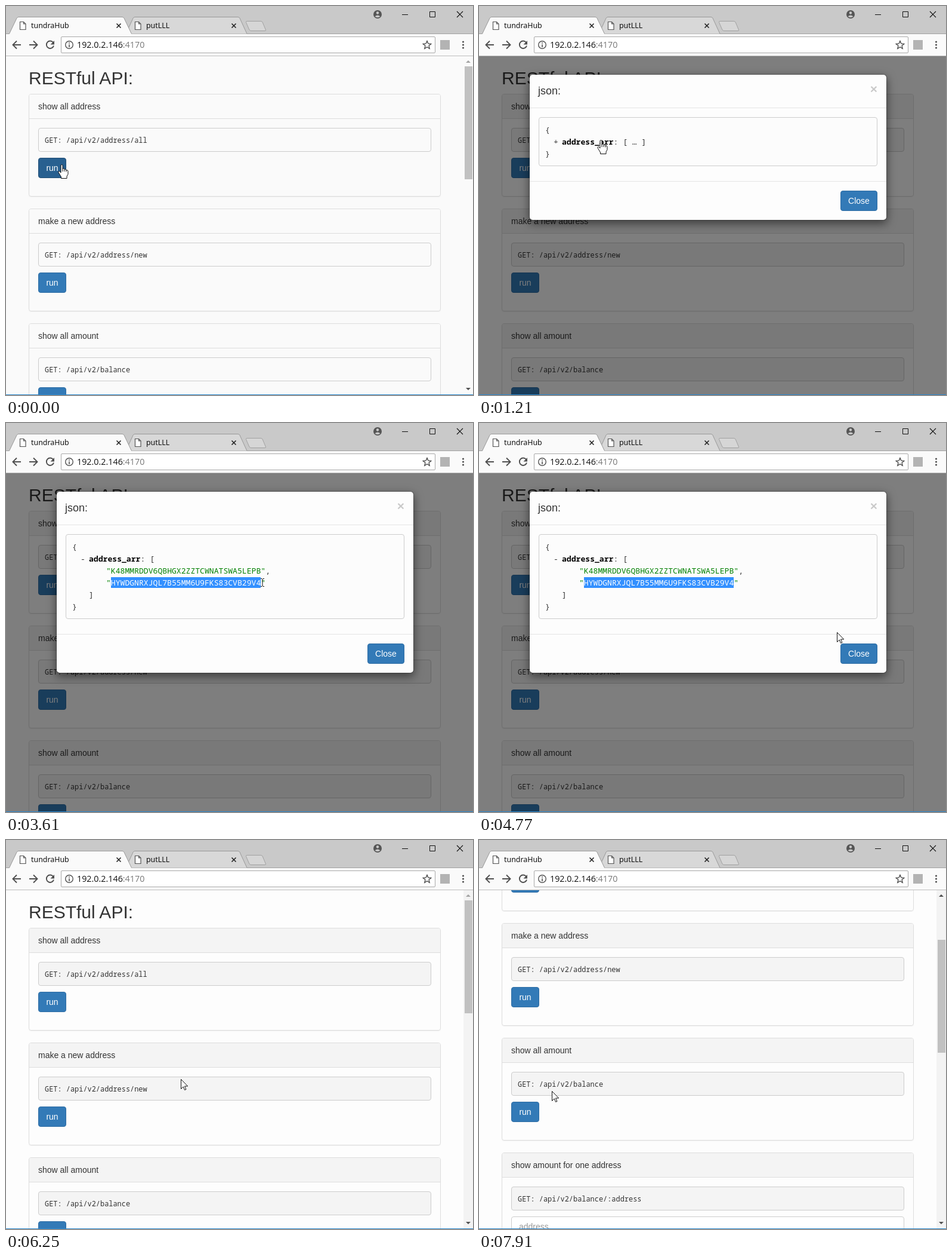
These frames come from a looping animation (783x651 px, 8000 ms). An HTML page:

```html
<!DOCTYPE html>
<html lang="en">
<head>
<meta charset="utf-8">
<title>API demo</title>
<style>
* { box-sizing: border-box; }
html, body { margin: 0; width: 100%; height: 100%; overflow: hidden; }
body { position: relative; background: #fdfdfd; color: #333; font: 14px/20px "Liberation Sans", Arial, sans-serif; }
svg { position: absolute; left: 0; top: 0; }

/* every animated part shares one 8 s clock and holds its pose between steps */
.view, .page, .tint, .first, .bar, .thumb, .up, .shade, .modal, .json, .short, .long, .sel, .close,
.cursor, .arrow, .hand, .beam { animation: 8s step-end infinite; }

/* page */
.view { position: absolute; left: 0; top: 84px; width: 783px; height: 566px; overflow: hidden; background: #fdfdfd; animation-name: pageTint; }
.page { position: absolute; left: 38px; top: 0; width: 691px; animation-name: scroll; }
h2 { margin: 20px 0 10px; font-size: 30px; line-height: 33px; font-weight: normal; }
.panel { height: 172px; margin-bottom: 20px; border: 1px solid #ddd; border-radius: 4px; box-shadow: 0 1px 1px rgba(0,0,0,.05); overflow: hidden; }
.tint { background: #f4f4f4; animation-name: tint; }
.head { height: 41px; padding: 10px 15px; border-bottom: 1px solid #ddd; }
.code { height: 40px; margin: 15px 15px 10px; padding: 9.5px 10px; border: 1px solid #ccc; border-radius: 4px; font: 11.93px/19px "Noto Sans Mono", monospace; }
.btn { width: 47px; height: 34px; margin-left: 15px; border: 1px solid #2e6da4; border-radius: 4px; background: #337ab7; color: #fff; line-height: 32px; text-align: center; }
.first { animation-name: runState; }
.field { height: 34px; margin: 0 15px; padding: 6px 12px; border: 1px solid #ccc; border-radius: 4px; background: #fff; color: #999; }

/* scrollbar */
.bar { position: absolute; right: 0; top: 0; width: 16px; height: 566px; background: #f3f3f3; animation-name: barState; }
.thumb { position: absolute; left: 2px; top: 17px; width: 13px; height: 189px; background: #c1c1c1; animation-name: thumb; }
.up { fill: #a3a3a3; animation-name: up; }

/* dialog */
.shade { position: absolute; inset: 0; background: #000; opacity: 0; animation-name: shade; }
.modal { position: absolute; left: 84px; top: 30px; width: 600px; border: 1px solid rgba(0,0,0,.2); border-radius: 6px; background: #fdfdfd; background-clip: padding-box; box-shadow: 0 5px 15px rgba(0,0,0,.5); opacity: 0; animation-name: modal; }
.title { height: 56px; padding: 15px 14px; border-bottom: 1px solid #e5e5e5; font-size: 18px; line-height: 25px; }
.title b { position: absolute; right: 15px; top: 13px; font-size: 21px; line-height: 21px; color: #000; opacity: .2; }
.json { position: relative; height: 82px; margin: 15px 15px 25px; border: 1px solid #ccc; border-radius: 4px; background: #fcfcfc; font: 13.1px/20px "Noto Sans Mono", monospace; white-space: pre; animation-name: json; }
.json > div { position: absolute; left: 10px; top: 9.5px; }
.short { animation-name: short; }
.long { visibility: hidden; animation-name: long; }
.key { padding-left: 28px; position: relative; }
.key i { position: absolute; left: 14px; font-style: normal; }
.key b { color: #000; }
.str { padding-left: 57px; position: relative; color: #333; }
.str span { color: #008000; }
.str .sel { position: absolute; left: calc(57px + 1ch); top: 1px; width: 0; height: 18px; line-height: 18px; overflow: hidden; background: #3390ff; color: #fff; animation-name: select; }
.foot { height: 65px; padding: 15px; border-top: 1px solid #e5e5e5; }
.close { width: 62px; margin-left: auto; animation-name: closeState; }

/* browser frame */
.tab { font: 12.4px "Noto Sans", sans-serif; fill: #111; }
.url { font: 14.3px "Open Sans", sans-serif; fill: #111; }
.line { position: absolute; left: 0; top: 650px; width: 783px; height: 1px; background: #2a87cc; }

/* pointer */
.cursor { overflow: visible; animation-name: move; }
.arrow, .hand, .beam { visibility: hidden; }
.arrow { animation-name: arrow; }
.hand { animation-name: hand; }
.beam { animation-name: beam; }

@keyframes pageTint { 0% { background: #fafafa } 3.875% { background: #fdfdfd } }
@keyframes tint { 0% { background: #fafafa } 3.875% { background: #f4f4f4 } }
@keyframes scroll { 0% { transform: none } 86.375% { transform: translateY(-100px) } 87.875% { transform: translateY(-200px) } }
@keyframes thumb { 0% { transform: none } 86.375% { transform: translateY(33px) } 87.875% { transform: translateY(66px) } }
@keyframes up { 0% { fill: #a3a3a3 } 86.375% { fill: #505050 } }
@keyframes barState {
  0% { visibility: visible; background: #fafafa }
  3.875% { visibility: hidden; background: #f3f3f3 }
  78.125% { visibility: visible; background: #f3f3f3 }
}
@keyframes runState {
  0% { background: #286090; border-color: #204d74; box-shadow: none }
  2% { background: #286090; border-color: #204d74; box-shadow: 0 0 0 1px #7fb0f5 }
  8.5% { background: #337ab7; border-color: #2e6da4; box-shadow: none }
}
@keyframes closeState {
  0% { background: #337ab7; border-color: #2e6da4; box-shadow: none }
  64.625% { background: #286090; border-color: #204d74; box-shadow: none }
  72.875% { background: #286090; border-color: #3f7fc4; box-shadow: 0 0 0 1px #6fa8f7 }
}
@keyframes shade { 0% { opacity: 0 } 3.875% { opacity: .24 } 5.375% { opacity: .5 } 78.125% { opacity: 0 } }
@keyframes modal {
  0% { opacity: 0; transform: none }
  5.375% { opacity: .25; transform: translateY(-45px) }
  6.875% { opacity: 1; transform: translateY(-15px) }
  8.5% { opacity: 1; transform: none }
  76.25% { opacity: .2; transform: translateY(-40px) }
  78.125% { opacity: 0; transform: none }
}
@keyframes json {
  0% { height: 82px; background: #fcfcfc }
  17% { height: 142px; background: #fcfcfc }
  72.875% { height: 142px; background: #f4f4f4 }
}
@keyframes short { 0% { visibility: visible } 17% { visibility: hidden } }
@keyframes long { 0% { visibility: hidden } 17% { visibility: visible } }
@keyframes select {
  0% { width: 0 } 33% { width: 1ch } 34.875% { width: 4ch } 36.375% { width: 9ch } 38.25% { width: 15ch }
  39.875% { width: 21ch } 41.625% { width: 26ch } 43.25% { width: 30ch } 45.125% { width: 32ch }
}
@keyframes move {
  0% { transform: translate(94px, 265px) }
  5.375% { transform: translate(86px, 265px) }
  8.5% { transform: translate(88px, 266px) }
  10.25% { transform: translate(110px, 255px) }
  11.875% { transform: translate(150px, 240px) }
  13.625% { transform: translate(185px, 228px) }
  15.125% { transform: translate(205px, 224px) }
  20.375% { transform: translate(200px, 226px) }
  22.25% { transform: translate(195px, 240px) }
  23.75% { transform: translate(188px, 252px) }
  25.625% { transform: translate(180px, 262px) }
  27.25% { transform: translate(177px, 266px) }
  29.125% { transform: translate(176px, 267px) }
  33% { transform: translate(184px, 267px) }
  34.875% { transform: translate(208px, 267px) }
  36.375% { transform: translate(247px, 267px) }
  38.25% { transform: translate(294px, 267px) }
  39.875% { transform: translate(341px, 267px) }
  41.625% { transform: translate(380px, 267px) }
  43.25% { transform: translate(412px, 267px) }
  45.125% { transform: translate(430px, 267px) }
  48.5% { transform: translate(426px, 267px) }
  50.375% { transform: translate(421px, 266px) }
  54.25% { transform: translate(440px, 272px) }
  56% { transform: translate(490px, 290px) }
  57.75% { transform: translate(550px, 325px) }
  59.5% { transform: translate(600px, 350px) }
  61.25% { transform: translate(625px, 363px) }
  64.625% { transform: translate(630px, 375px) }
  66.25% { transform: translate(634px, 384px) }
  67.875% { transform: translate(637px, 389px) }
  69.5% { transform: translate(639px, 392px) }
  76.25% { transform: translate(480px, 398px) }
  78.125% { transform: translate(293px, 400px) }
  79.625% { transform: translate(270px, 398px) }
  81.25% { transform: translate(256px, 396px) }
  83% { transform: translate(250px, 394px) }
  91.75% { transform: translate(236px, 396px) }
  93.5% { transform: translate(200px, 410px) }
  95.375% { transform: translate(155px, 424px) }
  97% { transform: translate(130px, 425px) }
  98.875% { transform: translate(122px, 420px) }
}
@keyframes arrow {
  0%, 15.125%, 64.625% { visibility: hidden }
  5.375%, 57.75%, 76.25% { visibility: visible }
}
@keyframes hand {
  0%, 15.125%, 64.625% { visibility: visible }
  5.375%, 22.25%, 76.25% { visibility: hidden }
}
@keyframes beam { 0%, 57.75% { visibility: hidden } 22.25% { visibility: visible } }
</style>
</head>
<body>
<div class="view">
  <div class="page">
    <h2>RESTful API:</h2>
    <div class="panel">
      <div class="head tint">show all address</div>
      <div class="code tint">GET: /api/v2/address/all</div>
      <div class="btn first">run</div>
    </div>
    <div class="panel">
      <div class="head tint">make a new address</div>
      <div class="code tint">GET: /api/v2/address/new</div>
      <div class="btn">run</div>
    </div>
    <div class="panel">
      <div class="head tint">show all amount</div>
      <div class="code tint">GET: /api/v2/balance</div>
      <div class="btn">run</div>
    </div>
    <div class="panel">
      <div class="head tint">show amount for one address</div>
      <div class="code tint">GET: /api/v2/balance/:address</div>
      <div class="field">address</div>
    </div>
  </div>
  <div class="bar">
    <div class="thumb"></div>
    <svg width="16" height="566">
      <path class="up" d="M4 11L8 7L12 11Z"/>
      <path fill="#505050" d="M4 555L8 559L12 555Z"/>
    </svg>
  </div>
  <div class="shade"></div>
  <div class="modal">
    <div class="title">json:<b>×</b></div>
    <div class="json">
      <div class="short"><div>{</div><div class="key"><i>+</i><b>address_arr</b>: [ … ]</div><div>}</div></div>
      <div class="long"><div>{</div><div class="key"><i>-</i><b>address_arr</b>: [</div><div class="str"><span>"K48MMRDDV6QBHGX2ZZTCWNATSWA5LEPB"</span>,</div><div class="str"><span>"HYWDGNRXJQL7B55MM6U9FKS83CVB29V4"</span><div class="sel">HYWDGNRXJQL7B55MM6U9FKS83CVB29V4</div></div><div class="key">]</div><div>}</div></div>
    </div>
    <div class="foot"><div class="btn close">Close</div></div>
  </div>
</div>

<svg width="783" height="84" fill="none">
  <path fill="#c9c9c9" d="M0 0H783V47H0Z"/>
  <path fill="#fafafa" d="M0 47H783V84H0Z"/>
  <path stroke="#a0a0a0" d="M0 46.5H783"/>
  <path stroke="#bdbdbd" d="M0 83.5H783"/>
  <path fill="#d8d8d8" stroke="#999" d="M201 46.5L213 20.5Q214 18.5 216 18.5H389Q391 18.5 392 20.5L404 46.5"/>
  <path fill="#fafafa" stroke="#999" d="M5.500 46.500L18 20.500Q19 18.500 21 18.500H195Q197 18.500 198 20.500L210.500 46.500"/>
  <path stroke="#fafafa" d="M6 46.500H210"/>
  <path fill="#d6d6d6" stroke="#a2a2a2" d="M404 25.500H427Q429 25.500 430 27L435.500 40Q436 41.500 434 41.500H411Q409 41.500 408 40L402.500 27.500Q402 25.500 404 25.500Z"/>
  <g id="doc" stroke="#555" stroke-width="1.200">
    <path fill="#fff" d="M23.500 26.500H29.500L33 30V39.500H23.500ZM29.500 26.500V30H33"/>
  </g>
  <use href="#doc" x="193"/>
  <path stroke="#222" stroke-width="1.600" d="M185.500 29.500L192.500 36.500M192.500 29.500L185.500 36.500M378.500 29.500L385.500 36.500M385.500 29.500L378.500 36.500"/>
  <g class="tab"><text x="42" y="37">tundraHub</text><text x="235" y="37">putLLL</text></g>

  <circle cx="623" cy="14" r="7" fill="#555"/>
  <circle cx="623" cy="11.500" r="2.200" fill="#c9c9c9"/>
  <path fill="#c9c9c9" d="M618.500 17.500Q623 13.500 627.500 17.500Q623 21 618.500 17.500Z"/>
  <path stroke="#111" d="M664 14.500H674M710.500 9.500H719.500V18.500H710.500Z"/>
  <path stroke="#111" stroke-width="1.200" d="M756 9L766 19M766 9L756 19"/>

  <path stroke="#505050" stroke-width="1.900" d="M25 65H12M18 58.500L11.500 65L18 71.500M39 65H52M46 58.500L52.500 65L46 71.500M79 61A6.200 6.200 0 1 0 80 66.500"/>
  <path fill="#505050" d="M81 58V64.500H74.500Z"/>
  <rect x="92.500" y="51.500" width="627" height="27" rx="1.500" fill="#fff" stroke="#a8a8a8"/>
  <circle cx="106" cy="65" r="6.300" stroke="#505050" stroke-width="1.400"/>
  <path stroke="#505050" stroke-width="1.600" d="M106 61V62.800M106 64.200V69"/>
  <text class="url" x="119" y="70">192.0.2.146<tspan fill="#777">:4170</tspan></text>
  <path stroke="#444" stroke-width="1.300" d="M706 58.500L707.900 63L712.700 63.400L709 66.500L710.200 71.300L706 68.700L701.800 71.300L703 66.500L699.300 63.400L704.100 63Z"/>
  <rect x="728" y="57" width="16" height="16" fill="#b3b3b3"/>
  <g fill="#505050"><circle cx="766.500" cy="60" r="1.600"/><circle cx="766.500" cy="65" r="1.600"/><circle cx="766.500" cy="70" r="1.600"/></g>
</svg>
<div class="line"></div>

<svg class="cursor" width="1" height="1" fill="#fff" stroke="#111">
  <path class="arrow" d="M.5 .5V16.500L4.200 12.900L6.600 18.400L8.900 17.400L6.500 12H11.700Z"/>
  <g class="hand">
    <path d="M-2 2Q-2 .5 -.5 .5T1 2V8Q1 6.800 2.600 7T4 8.600Q5.600 7.400 7 9.600Q9.600 9 10 11.500V16.500L8 20V23.500H-1.500V21L-6 13.500Q-6.500 11.500 -4.500 11.500L-2 14Z"/>
    <path d="M1 8V12M4 9V12M7 10V12.500"/>
  </g>
  <path class="beam" fill="none" d="M-3 -6.500H-1L0 -5.500L1 -6.500H3M0 -5.500V5.500M-3 6.500H-1L0 5.500L1 6.500H3"/>
</svg>
</body>
</html>
```
